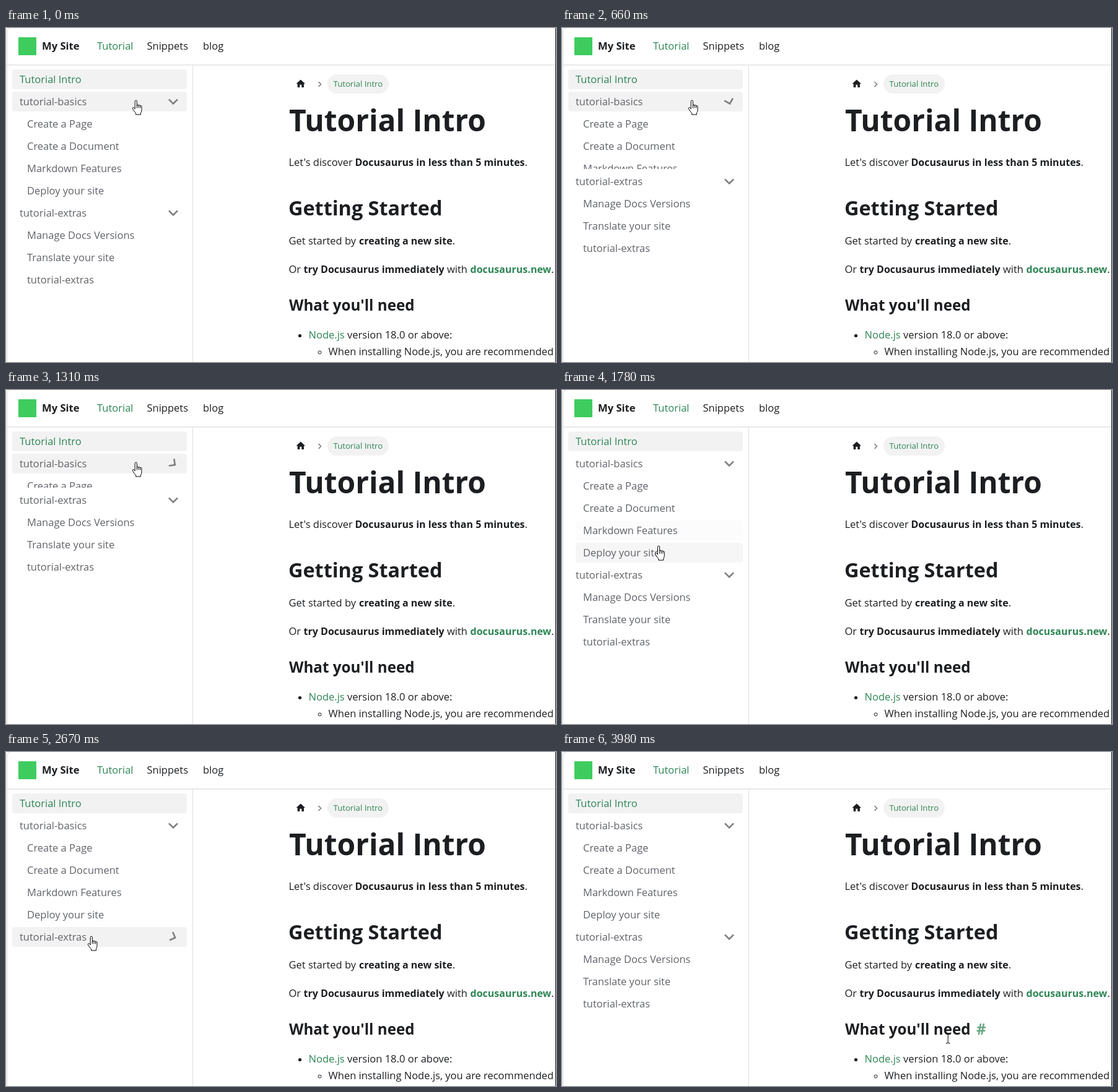
Animation of 888x540 px, one loop 4.02 s. Source, as an HTML page:

```html
<!DOCTYPE html>
<html lang="en">
<head>
<meta charset="utf-8">
<title>Tutorial Intro</title>
<style>
  html, body { margin: 0; width: 100%; height: 100%; overflow: hidden; background: #fff; }
  svg { display: block; font: 16.5px "Open Sans", "Noto Sans", sans-serif; fill: #1c1e21; }
  .b { font-weight: 700; font-size: 16.05px; }
  .g { fill: #2e8555; }
  .h1 { font-weight: 700; font-size: 47.85px; }
  .h2 { font-weight: 700; font-size: 32.4px; }
  .h3 { font-weight: 700; font-size: 24.2px; }
  .crumb { font-size: 13.2px; }
  .menu { fill: #606369; }
  .bg { fill: #f2f2f2; }
  .caret { fill: #808080; }
  .pen { fill: none; stroke: #1c1e21; }
</style>
</head>
<body>
<svg id="stage" width="888" height="540" viewBox="0 0 888 540">
  <defs>
    <clipPath id="clip0"><rect x="10" y="139" width="284" height="140"/></clipPath>
    <clipPath id="clip1"><rect x="10" y="319" width="284" height="104"/></clipPath>
  </defs>
  <rect width="888" height="540" fill="#fff"/>

  <!-- navbar -->
  <rect x="2" y="59" width="885" height="1" fill="#e2e2e2"/>
  <rect x="2" y="60" width="885" height="1" fill="#f1f1f1"/>
  <rect x="20" y="15" width="29" height="29" fill="#3ecc5f"/>
  <text x="58" y="35" class="b" style="font-size:16.6px">My Site</text>
  <text x="147" y="35" class="g">Tutorial</text>
  <text x="227.5" y="35">Snippets</text>
  <text x="318" y="35">blog</text>

  <!-- sidebar -->
  <rect x="301" y="60" width="1" height="480" fill="#dadde1"/>
  <rect x="10" y="67" width="282" height="32" rx="4" class="bg"/>
  <text x="22" y="89" class="g">Tutorial Intro</text>
  <g id="menu" class="menu"></g>

  <!-- breadcrumbs -->
  <path transform="translate(467 81.4) scale(.733)" d="M10 20v-6h4v6h5v-8h3L12 3 2 12h3v8z"/>
  <path d="M504.5 87l4 4-4 4" class="pen" style="stroke:#777;stroke-width:1.5"/>
  <rect x="519" y="75" width="99" height="31" rx="15.5" class="bg"/>
  <text x="528.5" y="95" class="g crumb">Tutorial Intro</text>

  <!-- article -->
  <text x="457" y="167" class="h1">Tutorial Intro</text>
  <text x="456.5" y="223">Let's discover</text>
  <text x="563.5" y="223"><tspan class="b">Docusaurus in less than 5 minutes</tspan>.</text>
  <text x="456" y="303" class="h2">Getting Started</text>
  <text x="456.5" y="350">Get started by</text>
  <text x="570" y="350"><tspan class="b">creating a new site</tspan>.</text>
  <text x="456.5" y="396">Or</text>
  <text x="480.5" y="396" class="b">try Docusaurus immediately</text>
  <text x="712" y="396">with</text>
  <text x="749.5" y="396"><tspan class="b g">docusaurus.new</tspan>.</text>
  <text x="457" y="457" class="h3">What you'll need</text>
  <text x="669" y="457" class="h3 g" id="hash" opacity="0">#</text>
  <circle cx="474.5" cy="497.5" r="2.6"/>
  <text x="488.5" y="502" class="g">Node.js</text>
  <text x="551" y="502">version 18.0 or above:</text>
  <circle cx="506.5" cy="524.5" r="2.5" class="pen"/>
  <text x="520.5" y="529">When installing Node.js, you are recommended</text>

  <!-- window edges -->
  <path d="M1.5 540V7Q1.5 1 6 0" class="pen" style="stroke:#d4d4d4"/>
  <rect x="887" width="1" height="540" fill="#111"/>

  <g id="cursor" stroke="#000" stroke-linejoin="round" stroke-linecap="round">
    <path id="hand" fill="#fff" d="M-1.6 12V1.6a1.6 1.6 0 0 1 3.2 0V8.4a1.3 1.3 0 0 1 2.6.2 1.3 1.3 0 0 1 2.6.5 1.3 1.3 0 0 1 2.4.8V15.5Q9.2 18.5 7.7 20.4V23H-.2V20.6Q-2.5 18.5-5 14.2-6.2 12-4.6 11.4-3.2 11-1.6 13.6zM1.6 8.4V12M4.2 8.8V12M6.8 9.3V12"/>
    <path id="arrow" fill="#fff" d="M0 0V16.5L3.8 13 6.2 18.6 8.6 17.6 6.2 12H11.5z"/>
    <path id="beam" fill="none" d="M-3-7.5H-1L0-6.5 1-7.5H3M0-6.5V6.5M-3 7.5H-1L0 6.5 1 7.5H3"/>
  </g>
</svg>
<script>
const LOOP = 4020, TICK = 46.85, SPIN = 200, LEAD = 16, FADE = 200;
const $ = id => document.getElementById(id);
const clamp = v => Math.min(1, Math.max(0, v));

function bezier(x1, y1, x2, y2) {
  const at = (a, b, s) => 3 * (1 - s) ** 2 * s * a + 3 * (1 - s) * s * s * b + s ** 3;
  return x => {
    if (x <= 0) return 0;
    if (x >= 1) return 1;
    let lo = 0, hi = 1;
    for (let i = 0; i < 24; i++) {
      const mid = (lo + hi) / 2;
      if (at(x1, x2, mid) < x) lo = mid; else hi = mid;
    }
    return at(y1, y2, lo);
  };
}
const inOut = bezier(.42, 0, .58, 1);
const ease = bezier(.25, .1, .25, 1);
const fast = bezier(.08, .52, .52, 1);

// each toggle flips the section, starting open; the caret leads the list slightly
const sections = [
  { title: "tutorial-basics", y: 103, dur: 258, toggles: [160, 506, 875, 1246],
    items: ["Create a Page", "Create a Document", "Markdown Features", "Deploy your site"] },
  { title: "tutorial-extras", y: 283, dur: 241, toggles: [2212, 2640, 2980, 3366],
    items: ["Manage Docs Versions", "Translate your site", "tutorial-extras"] }
];

// pointer moves: start, end, x, y
const home = [209.8, 117];
const moves = [
  [1490, 1795, 156, 252.3],
  [1795, 1968, 154.5, 260],
  [1968, 2180, 137.8, 298],
  [3610, 3995, 623.5, 463.5]
];

function pointer(t) {
  let [x, y] = home;
  for (const [from, to, nx, ny] of moves) {
    const p = ease((t - from) / (to - from));
    x += (nx - x) * p;
    y += (ny - y) * p;
  }
  return [x, y];
}

const rows = [];
function addRow(parent, x, y, label) {
  parent.insertAdjacentHTML("beforeend",
    `<rect x="${x}" y="${y}" width="${292 - x}" height="32" rx="4" class="bg" opacity="0"/>
     <text x="${x + 12}" y="${y + 22}">${label}</text>`);
  rows.push({ x, y, bg: parent.querySelector("rect:last-of-type"), spans: [] });
}

function addGroup(parent) {
  return parent.appendChild(document.createElementNS("http://www.w3.org/2000/svg", "g"));
}

sections.forEach((s, i) => {
  s.group = addGroup($("menu"));
  addRow(s.group, 10, s.y, s.title);
  s.group.insertAdjacentHTML("beforeend",
    '<path class="caret" d="M7.41 15.41L12 10.83l4.59 4.58L18 14l-6-6-6 6z"/>');
  s.caret = s.group.lastElementChild;
  s.list = addGroup(s.group);
  s.list.setAttribute("clip-path", `url(#clip${i})`);
  s.items.forEach((label, n) => addRow(s.list, 22, s.y + 36 * (n + 1), label));
  s.full = s.items.length * 36 - 4;
  s.clip = $("clip" + i).firstElementChild;
});

// note when the pointer enters and leaves each row
let hovered = null;
for (let t = 0; t <= LOOP; t++) {
  const [x, y] = pointer(t);
  const hit = rows.find(r => x >= r.x && x < 292 && y >= r.y && y < r.y + 32) || null;
  if (hit === hovered) continue;
  if (hovered) hovered.spans.at(-1)[1] = t;
  if (hit) hit.spans.push([t || -FADE, Infinity]);
  hovered = hit;
}

// open flag and time since the latest toggle
function fold(s, t) {
  const past = s.toggles.filter(v => v <= t);
  return [past.length % 2 === 0, past.length ? t - past.at(-1) : Infinity];
}

function foldState(s, t) {
  const [open, since] = fold(s, t);
  const [down, turning] = fold(s, t + LEAD);
  const grow = inOut(since / s.dur), turn = clamp(turning / SPIN);
  return {
    height: s.full * (open ? grow : 1 - grow),
    gap: open || since < s.dur ? 4 : 0,
    angle: down ? 90 + 90 * turn : 180 - 90 * turn
  };
}

function draw(t) {
  let shift = 0;
  for (const s of sections) {
    const { height, gap, angle } = foldState(s, t);
    s.group.setAttribute("transform", `translate(0 ${Math.round(shift)})`);
    s.clip.setAttribute("height", Math.round(height));
    s.caret.setAttribute("transform",
      `translate(270 ${s.y + 16}) rotate(${angle}) scale(1.333) translate(-12 -12)`);
    shift += height + gap - s.full - 4;
  }
  for (const r of rows) {
    const level = r.spans.map(([a, b]) => fast((t - a) / FADE) * (1 - fast((t - b) / FADE)));
    r.bg.setAttribute("opacity", Math.max(0, ...level));
  }
  const [x, y] = pointer(t);
  const kind = x < 292 ? "hand" : x < 457 ? "arrow" : "beam";
  for (const id of ["hand", "arrow", "beam"])
    $(id).setAttribute("visibility", id === kind ? "visible" : "hidden");
  $("cursor").setAttribute("transform", `translate(${x} ${y})`);
  $("hash").setAttribute("opacity", fast((t - 3908) / FADE));
}

const start = performance.now();
function frame() {
  const t = (performance.now() - start) % LOOP;
  draw(Math.floor((t + 3) / TICK) * TICK);
  requestAnimationFrame(frame);
}
frame();
</script>
</body>
</html>
```
